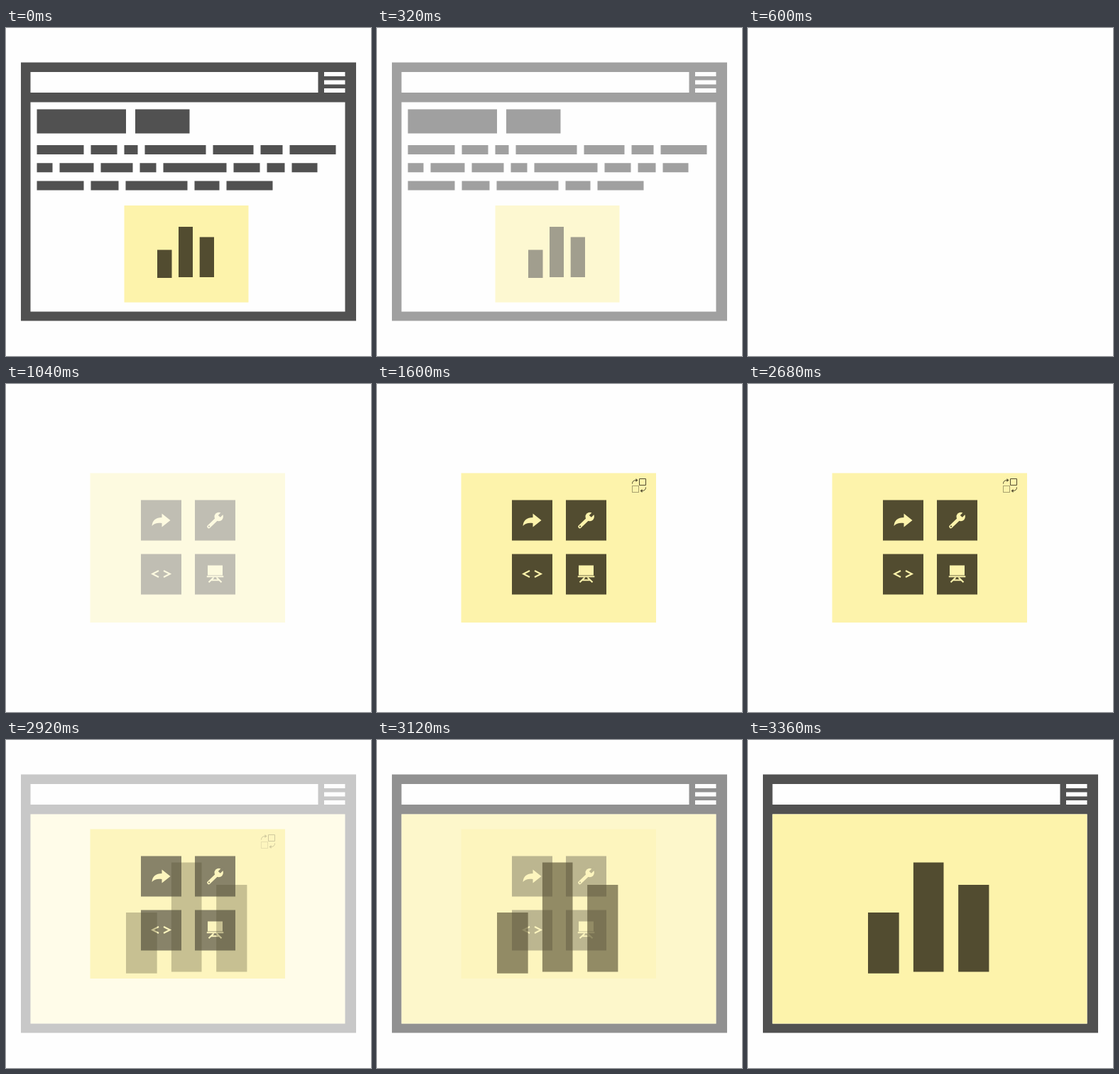
These frames come from a looping animation (514 px wide and 462 px high, 3400 ms). An HTML page:

```html
<!DOCTYPE html>
<html lang="en">
<head>
<meta charset="utf-8">
<title>Browser panel loop</title>
<style>
  html, body { margin: 0; width: 100%; height: 100%; overflow: hidden; background: #fefefe; }
  svg { display: block; width: 514px; height: 462px; }
  .grey { fill: #515151; }
  .yellow { fill: #fdf3ab; }
  .dark { fill: #524c30; }
  .line { fill: none; stroke: #fdf3ab; stroke-width: 2.1; }
  .thin { fill: none; stroke: #524c30; }
</style>
</head>
<body>
<svg viewBox="0 0 514 462">
  <defs>
    <path id="chart" class="dark" d="M0 0H20.5V39.5H0Z M30 -32.5H50V38.5H30Z M59.7 -18H80V38.5H59.7Z"/>
  </defs>
  <path id="frame" class="grey" fill-rule="evenodd"/>
  <g id="article">
    <path id="words" class="grey"/>
    <path class="yellow" d="M166.5 250H341.5V386.5H166.5Z"/>
    <use href="#chart" transform="translate(213 312.5)"/>
  </g>
  <path id="fill" class="yellow" d="M34.5 104.5H477.5V399.5H34.5Z"/>
  <g id="panel">
    <path class="yellow" d="M118.5 125.5H393V336H118.5Z"/>
    <path id="tiles" class="dark"/>
    <path class="yellow" d="M219.5 182.5L231.5 192L219.5 201.5V196C213 195.5 209 196 205.5 200C206 192 211 188 219.5 188Z"/>
    <g id="wrench">
      <path class="line" style="stroke-width:4.6;stroke-linecap:round" d="M285.5 201L298 189"/>
      <circle class="yellow" cx="299.7" cy="187" r="6.2"/>
      <path class="thin" stroke-width="4.2" d="M300.3 186.4L306.5 180"/>
      <circle class="dark" cx="286" cy="200.6" r="1.1"/>
    </g>
    <path class="line" d="M215 263L206.3 267.5L215 272M222 263L230.8 267.5L222 272"/>
    <g id="tile">
      <path class="dark" d="M266 239.5H323V296.5H266Z"/>
      <path class="yellow" d="M284 255.5H305V269.5H284Z M282.8 270.3H306.3V272.3H282.8Z"/>
      <path class="line" d="M292.5 272.5L285.5 279.3M296.5 272.5L303.5 279.3M289 276.3H300"/>
    </g>
    <g id="swap">
      <path class="thin" d="M369.5 133.5h9v9h-9Z M359.5 140.5Q359.5 135.5 365 135.5M378.5 145.5Q378.5 150.5 373 150.5"/>
      <path class="thin" stroke-dasharray="1" d="M359.5 143.5h9v9h-9Z"/>
      <path class="dark" d="M364.5 133l3 2.5l-3 2.5Z M373.5 148l-3 2.5l3 2.5Z"/>
    </g>
  </g>
  <use id="bars" href="#chart" transform="translate(169 243) scale(2.13 2.17)"/>
</svg>
<script>
const LOOP = 3400, STEP = 40;
const el = id => document.getElementById(id);
const rect = (x, y, w, h) => `M${x} ${y}h${w}v${h}h${-w}Z`;
const shape = (id, parts) => el(id).setAttribute('d', parts.join(''));

// Redacted article: word widths flow from left to right and wrap.
function flow(widths, left, right, top, leading, gap) {
  let x = left, y = top;
  return widths.map(w => {
    if (x + w > right) { x = left; y += leading; }
    const word = rect(x, y, w, 13);
    x += w + gap;
    return word;
  });
}

const widths = [66, 37, 19, 86, 57, 31, 65, 22, 48, 45, 23, 89, 37, 25, 36, 66, 39, 87, 35, 65];
shape('words', [
  rect(43.5, 114.5, 125.5, 34), rect(182, 114.5, 76.5, 34),
  ...flow(widths, 43.5, 468, 165, 25.2, 10)
]);

const stripes = [0, 1, 2].map(i => rect(448, 62 + 11.5 * i, 29.5, 6));
shape('frame', [
  rect(21, 48.5, 472, 364), rect(34.5, 62, 405, 29), rect(34.5, 104.5, 443, 295), ...stripes
]);
// The fourth tile is drawn apart because it gets pressed.
shape('tiles', [0, 1, 2].map(i => rect(190 + 76 * (i % 2), 163.5 + 76 * (i >> 1), 57, 57)));

const ramp = (t, from, to) => Math.min(1, Math.max(0, (t - from) / (to - from)));
const fade = (id, v) => el(id).setAttribute('opacity', v);

function draw(time) {
  const t = Math.floor((time % LOOP) / STEP) * STEP;
  const out = 1 - ramp(t, 80, 600);
  const back = ramp(t, 2720, 3360);
  fade('frame', Math.max(out, back));
  fade('article', out);
  fade('fill', ramp(t, 2760, 3360));
  fade('panel', ramp(t, 840, 1400) * (1 - back));
  fade('swap', ramp(t, 1040, 1600) * (1 - ramp(t, 2720, 3040)));
  fade('bars', back);
  const press = 1 + 0.2 * Math.sin(Math.PI * ramp(t, 2280, 2640));
  el('tile').setAttribute('transform', `translate(294.5 268) scale(${press}) translate(-294.5 -268)`);
}

const start = performance.now();
function tick() {
  draw(performance.now() - start);
  requestAnimationFrame(tick);
}
tick();
</script>
</body>
</html>
```
